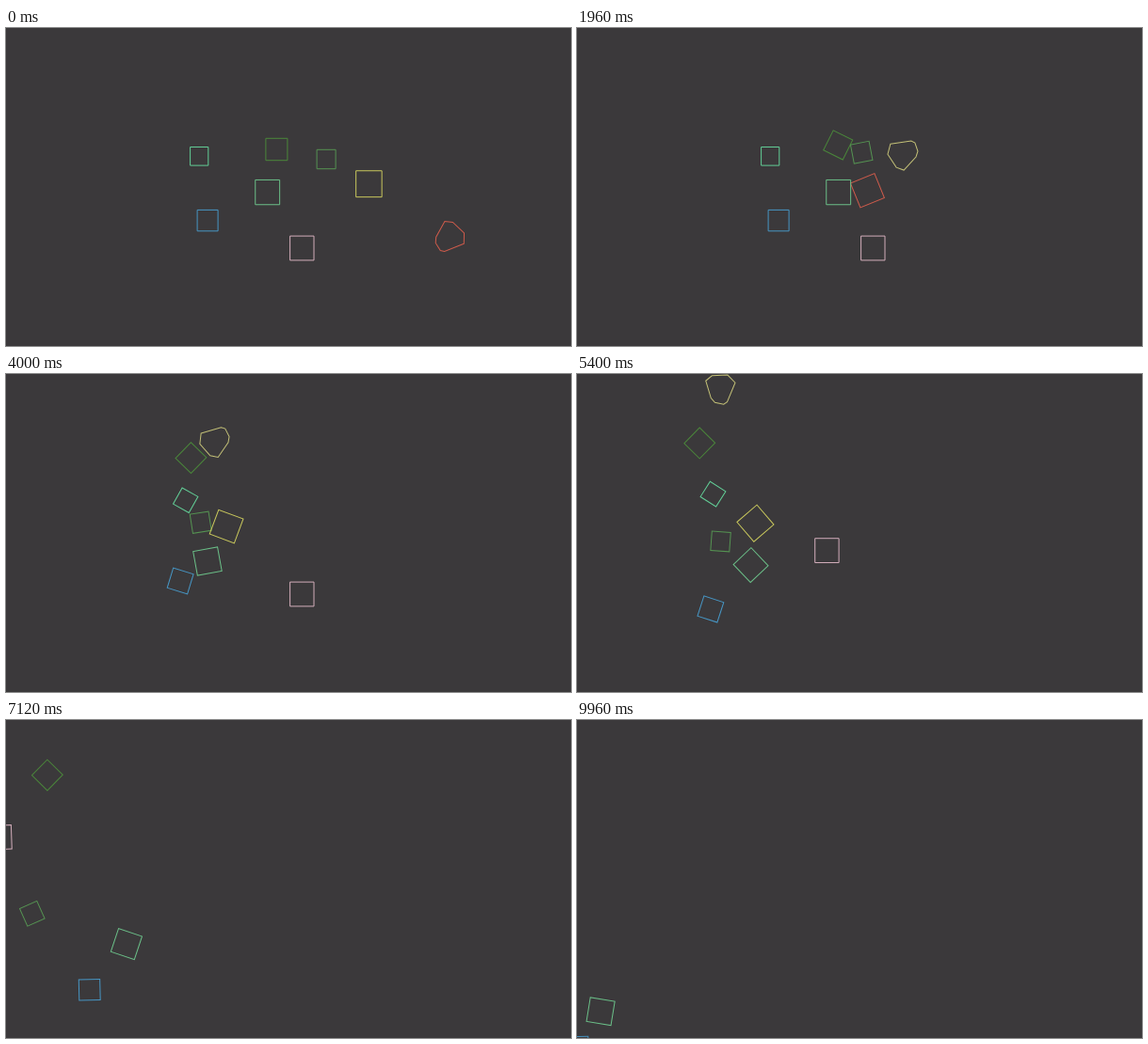
Animation, 600 px wide and 338 px high, one loop 10 s. Source, as an HTML page with a canvas:

```html
<!DOCTYPE html>
<html lang="en">
<head>
<meta charset="utf-8">
<title>Drifting boxes</title>
<style>
html, body { margin: 0; width: 100%; height: 100%; overflow: hidden; background: #3b393b; }
canvas { display: block; }
</style>
</head>
<body>
<canvas id="stage" width="600" height="338"></canvas>
<script>
const ctx = document.getElementById('stage').getContext('2d');
const LOOP = 10, FPS = 25;
const RED = '#cf5b4b', YELLOW = '#c9c85c', PALE = '#c3c077';

// A frictionless body: it rests, then each hit gives it a new velocity (px/s) and spin (deg/s).
class Body {
  constructor(x, y, color, angle = 0) {
    Object.assign(this, { x, y, color, angle, hits: [] });
  }

  hit(time, vx, vy, spin, color) {
    this.hits.push({ time, vx, vy, spin, color });
    return this;
  }

  poseAt(t) {
    let { x, y, angle, color } = this;
    this.hits.forEach((hit, i) => {
      if (t < hit.time) return;
      const next = this.hits[i + 1];
      const dt = Math.min(t, next ? next.time : LOOP) - hit.time;
      x += hit.vx * dt;
      y += hit.vy * dt;
      angle += hit.spin * dt;
      color = hit.color || color;
    });
    return { x, y, angle, color };
  }

  draw(t) {
    const { x, y, angle, color } = this.poseAt(t);
    ctx.save();
    ctx.translate(x, y);
    ctx.rotate(angle * Math.PI / 180);
    ctx.beginPath();
    this.trace();
    ctx.closePath();
    ctx.strokeStyle = color;
    ctx.stroke();
    ctx.restore();
  }
}

class Box extends Body {
  constructor(x, y, size, color) {
    super(x, y, color);
    this.size = size;
  }

  trace() {
    const { size } = this;
    ctx.rect(-size / 2, -size / 2 - 0.2, size, size + 0.4);
  }
}

class Pebble extends Body {
  trace() {
    ctx.moveTo(-13.3, -11.5);
    ctx.lineTo(8.7, -14.5);
    ctx.lineTo(12.7, -12.5);
    ctx.lineTo(15.7, -3.5);
    ctx.lineTo(13.7, 2.5);
    ctx.lineTo(0.7, 16.5);
    ctx.lineTo(-7.3, 13.5);
    ctx.lineTo(-16.3, -0.5);
  }
}

const bodies = [
  new Box(205.2, 136.3, 19.2, '#62cd96')
    .hit(3.56, -33, -4.7, 66.5)
    .hit(5.68, -167, -100, 100),

  new Box(287.4, 129, 23, '#4a873a')
    .hit(1.7, -39.2, -17.6, 102)
    .hit(3.9, -47.3, -11.2, 0)
    .hit(5.4, -50.2, -8.7, 0),

  new Box(340.1, 139.5, 20, '#559352')
    .hit(1.29, -62, -24, -26)
    .hit(1.72, -46.8, 12.5, 1)
    .hit(4, -38.7, 14.5, 9.3)
    .hit(5.56, -76, 16.3, -19),

  new Box(385.4, 165.7, 27.5, YELLOW)
    .hit(1, -80.2, 7.4, -23, RED)
    .hit(1.98, -36, -5.4, -23.3, YELLOW)
    .hit(4, -31.9, -2.4, -43.6)
    .hit(5.49, -158, -37, -130),

  new Box(277.7, 174.6, 25.9, '#6bbf88')
    .hit(1.98, -35, 14, 0)
    .hit(2.86, -28.9, 10.6, -88)
    .hit(4, -21, 2.9, -88)
    .hit(5.77, -36.2, 25.2, -130),

  new Box(214.1, 204.6, 22, '#4796c4')
    .hit(2.86, -25.4, 13.5, -64)
    .hit(4, -30.9, 21.4, -63.6),

  new Box(314.3, 234, 25.4, '#d3aebb')
    .hit(4.14, 330, 22, 0)
    .hit(4.78, -419.5, -97.5, 0)
    .hit(5.49, -144, -33.2, -56.4),

  new Pebble(470.6, 221.3, RED, 166)
    .hit(0, 320, -30, -160)
    .hit(0.35, -254, -93.6, -160)
    .hit(1.01, -72.3, -15.2, -5, PALE)
    .hit(1.96, -61, -30.4, -5)
    .hit(3.98, -50.5, -41, 92)
];

function render(seconds) {
  const t = Math.floor((seconds % LOOP) * FPS + 1e-6) / FPS;
  ctx.fillStyle = '#3b393b';
  ctx.fillRect(0, 0, 600, 338);
  ctx.lineWidth = 1;
  bodies.forEach(body => body.draw(t));
}

const start = performance.now();
function tick() {
  render((performance.now() - start) / 1000);
  requestAnimationFrame(tick);
}
tick();
</script>
</body>
</html>
```
